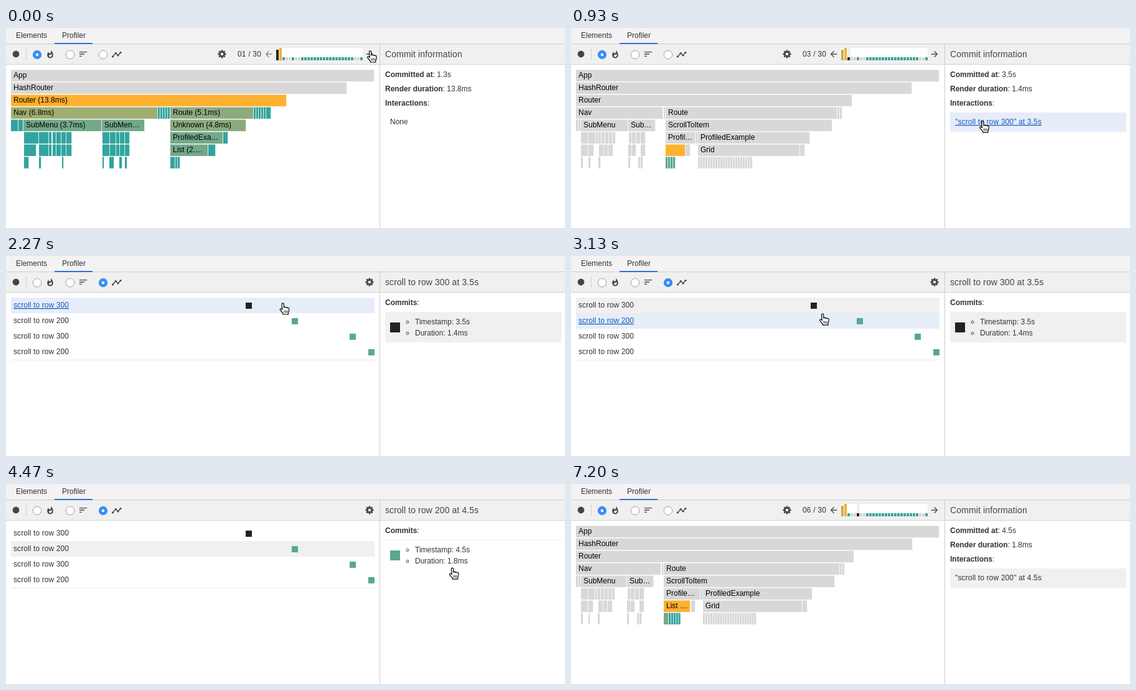
These frames come from a looping animation (898 by 322 pixels, 7590 ms). An HTML page:

```html
<!DOCTYPE html>
<html lang="en">
<head>
<meta charset="utf-8">
<title>Profiler</title>
<style>
html, body { margin: 0; width: 100%; height: 100%; overflow: hidden; background: #fff; }
svg { display: block; width: 898px; height: 322px; font-family: "Liberation Sans", Arial, sans-serif; font-size: 12px; }
text { white-space: pre; }
</style>
</head>
<body>
<svg viewBox="0 0 898 322">
  <g id="scene"></g>
  <g id="hand" stroke="#000" stroke-linejoin="round" stroke-linecap="round">
    <path fill="#fff" stroke-width="1.2" d="M-4.5-7.5c0-2.2 3.2-2.2 3.2 0L-1.1-2c.6-1.5 2.8-1.2 2.9.2 .8-1.1 2.6-.8 2.8.6 1-.8 2.6-.3 2.6 1.2 0 3-.3 4.5-1.4 6.5V9H-2.6V7.5C-3.8 5.9-5.4 4.1-7 2.1c-1.2-1.6.8-3 2.2-1.7l1.1 1.1z"/>
    <path fill="none" stroke-width=".9" d="M-.6 3v3.2M1.7 3v3.2M4 3v3.2"/>
  </g>
</svg>
<script>
const LOOP = 7590, STEP = 1000 / 15;
const GREY = '#d8d8d8', TEAL = '#32a49f', GOLD = '#feb02f', SAGE = '#74a88b', MOSS = '#8bab7e', OLIVE = '#a0ad70';
const MINT = '#58a892', INK = '#222', ICON = '#454545', PANEL = '#f0f0f0', HOVER = '#e6edf9', LINK = '#1259bd';

// time, x, y of the pointer
const PATH = [
  [0, 588, 46], [400, 589, 47], [800, 655, 143], [930, 664, 159], [1270, 671, 162], [2000, 671, 162],
  [2270, 447, 85], [2730, 406, 84], [2800, 406, 85], [3130, 407, 102], [3330, 421, 121], [3800, 421, 121],
  [4130, 600, 168], [4470, 720, 144], [4800, 724, 128], [5330, 724, 128], [5670, 505, 47],
  [6130, 462, 45], [6330, 530, 41], [6470, 591, 53], [LOOP, 591, 53]
];
const COMMITS = {
  1: { at: '1.3s', took: '13.8ms' },
  2: { at: '2.6s', took: '14.9ms' },
  3: { at: '3.5s', took: '1.4ms', label: '"scroll to row 300" at 3.5s' },
  6: { at: '4.5s', took: '1.8ms', label: '"scroll to row 200" at 4.5s', picked: true }
};
const ROWS = [[300, 385], [200, 459], [300, 552], [200, 582]];

const rect = (x, y, w, h, fill) => `<rect x="${x}" y="${y}" width="${w}" height="${h}" fill="${fill}"/>`;
const text = (x, y, s, fill = '#333', more = '') => `<text x="${x}" y="${y}" fill="${fill}" ${more}>${s}</text>`;
const icon = (x, y, scale, d, fill = ICON) =>
  `<path transform="translate(${x} ${y}) scale(${scale}) translate(-12 -12)" fill="${fill}" d="${d}"/>`;
const bold = s => `<tspan font-weight="bold">${s}</tspan>`;
const spaced = n => `letter-spacing="${n}"`;
const times = (n, f) => Array.from({ length: n }, (_, i) => f(i)).join('');

function gear(x, y) {
  const teeth = times(8, i => `<path d="M0-4v-2.6" stroke-width="2.6" transform="rotate(${i * 45})"/>`);
  return `<g transform="translate(${x} ${y})" fill="none" stroke="${ICON}"><circle r="3.7" stroke-width="2.8"/>${teeth}</g>`;
}

function radio(x, on) {
  return on
    ? `<circle cx="${x}" cy="43" r="7.2" fill="#3a8ef6"/><circle cx="${x}" cy="43" r="2.2" fill="#fff"/>`
    : `<circle cx="${x}" cy="43" r="6.8" fill="#fff" stroke="#a0a0a0"/>`;
}

function chrome(flame) {
  const dots = [[171.5, 46], [176.3, 40.5], [180, 44], [184, 39.5]];
  return rect(0, 0, 898, 25, '#f3f3f3') + rect(0, 26, 898, 32, PANEL) +
    rect(0, 25, 898, 1, '#ccc') + rect(0, 58, 898, 1, '#d2d2d2') + rect(600, 26, 1, 296, '#ccc') +
    rect(78, 24, 61, 2, '#2d70d8') + text(16, 16, 'Elements') + text(90, 16, 'Profiler') +
    `<circle cx="16" cy="42" r="5.4" fill="${ICON}"/>` + rect(32, 33, 1, 18, '#d0d0d0') +
    radio(50, flame) + radio(103, false) + radio(156, !flame) +
    icon(71, 42.5, .6, 'M13.5.67s.74 2.65.74 4.8c0 2.06-1.35 3.73-3.41 3.73-2.07 0-3.63-1.67-3.63-3.73l.03-.36C5.21 7.51 4 10.62 4 14c0 4.42 3.58 8 8 8s8-3.58 8-8C20 8.61 17.41 3.8 13.5.67zM11.71 19c-1.78 0-3.22-1.4-3.22-3.14 0-1.62 1.05-2.76 2.81-3.12 1.77-.36 3.6-1.21 4.62-2.58.39 1.29.59 2.65.59 4.04 0 2.65-2.15 4.8-4.8 4.8z') +
    icon(124, 42, .68, 'M3 18h6v-2H3v2zM3 6v2h18V6H3zm0 7h12v-2H3v2z') +
    `<polyline points="${dots.join(' ')}" fill="none" stroke="${ICON}" stroke-width="1.4"/>` +
    dots.map(([x, y]) => `<circle cx="${x}" cy="${y}" r="1.6" fill="${ICON}"/>`).join('') +
    gear(flame ? 347 : 584, 42);
}

function snapshots(n) {
  const bar = i => {
    const x = 434 + i * 5, h = i == 0 ? 17 : i == 1 ? 20 : 5;
    const teal = i == 2 || i == 5 || i == 27 || (i > 7 && i < 25);
    const fill = i == n - 1 ? INK : i == 0 ? '#d0aa48' : i == 1 ? '#f2b038' : teal ? '#3da598' : '#d4d4d4';
    return (i == n - 1 ? rect(x, 32, 5, 20, PANEL) : '') + rect(x, 52 - h, 4, h, fill);
  };
  return text(372, 46, `0${n} / 30`, '#333', spaced(.2)) + rect(434, 32, 139, 20, '#fff') + times(28, bar) +
    icon(422, 42, .66, 'M20 11H7.83l5.59-5.59L12 4l-8 8 8 8 1.41-1.41L7.83 13H20v-2z', n == 1 ? '#858585' : ICON) +
    icon(584, 42, .66, 'M4 11h12.17l-5.59-5.59L12 4l8 8-8 8-1.41-1.41L16.17 13H4v-2z');
}

// one flame chart cell, or a row of unlabelled ones given as start/end pairs
function cell(row, x, end, fill, label = '') {
  const y = 67 + row * 20;
  return rect(x, y + .5, end - x - .8, 18.6, fill) + (label && text(x + 4, y + 13, label, '#000'));
}
function cells(row, fill, ...ends) {
  let out = '';
  for (let i = 0; i < ends.length; i += 2) out += cell(row, ends[i], ends[i + 1], fill);
  return out;
}
const run = (row, fill, x, n, pitch) => times(n, i => cell(row, x + i * pitch, x + (i + 1) * pitch, fill));

function firstTree() {
  const leaves = row =>
    cells(row, TEAL, 53, 69, 69, 74, 75, 81, 81, 89, 89, 97, 97, 106, 155, 167, 167, 177, 177, 183, 183, 191, 191, 199);
  return cell(0, 8, 592, GREY, 'App') + cell(1, 8, 548, GREY, 'HashRouter') +
    cell(2, 8, 451, GOLD, 'Router (13.8ms)') +
    cell(3, 8, 244, OLIVE, 'Nav (6.8ms)') + run(3, TEAL, 244, 5, 4) +
    cell(3, 264, 398, MOSS, 'Route (5.1ms)') + run(3, TEAL, 398, 5, 4) + cells(3, TEAL, 418, 426) +
    cells(4, TEAL, 8, 20, 20, 28) + cell(4, 28, 154, SAGE, 'SubMenu (3.7ms)') +
    cell(4, 154, 223, SAGE, 'SubMen…') + cell(4, 264, 386, MOSS, 'Unknown (4.8ms)') +
    cells(5, TEAL, 29, 53) + leaves(5) + cell(5, 264, 349, SAGE, 'ProfiledExa…') + cells(5, TEAL, 349, 357) +
    cells(6, TEAL, 29, 49) + leaves(6) + cell(6, 264, 325, SAGE, 'List (2.…') + cells(6, TEAL, 325, 337) +
    cells(7, TEAL, 29, 37, 53, 57, 90, 93, 155, 158, 166, 174, 182, 187, 191, 195, 264, 272, 272, 276, 276, 280);
}

function navTree(scale) {
  const s = x => Math.round(8 + (x - 8) * scale);
  const part = (row, ...xs) => cells(row, GREY, ...xs.map(s));
  return cell(3, 8, s(148), GREY, 'Nav') + part(3, 149, 152) + part(4, 8, 12, 12, 16) +
    cell(4, 16, s(92), GREY, 'SubMenu') + cell(4, s(92), s(136), GREY, 'Sub…') +
    part(5, 16, 28, 28, 40, 40, 44, 44, 49, 49, 55, 55, 61, 61, 67, 67, 72, 93, 98, 98, 105, 105, 112, 112, 120) +
    part(6, 16, 28, 28, 37, 45, 53, 53, 60, 60, 68, 92, 98, 98, 105, 112, 120) +
    part(7, 16, 20, 28, 32, 44, 48, 92, 96, 108, 112, 112, 116);
}

function laterTree(n) {
  const six = n == 6, hot = n == 2, pick = (a, b) => six ? a : b;
  const warm = hot ? GOLD : GREY, mild = hot ? OLIVE : GREY, x = pick(149, 152), x2 = pick(212, 204);
  return cell(0, 8, 592, GREY, 'App') + cell(1, 8, pick(549, 548), GREY, 'HashRouter') +
    cell(2, 8, pick(455, 452), GREY, 'Router') + navTree(pick(.979, 1)) +
    cell(3, x, pick(432, 428), warm, 'Route') + run(3, GREY, pick(432, 428), 2, 4) +
    cell(4, x, pick(424, 420), warm, 'ScrollToItem') +
    cell(5, x, x2 - 4, mild, pick('Profile…', 'Profil…')) + cell(5, x2 - 4, x2, GREY) +
    cell(5, x2, pick(388, 384), mild, 'ProfiledExample') +
    cell(6, x, pick(192, 184), hot ? TEAL : GOLD, pick('List …', '')) + cell(6, pick(193, 184), pick(200, 192), GREY) +
    cell(6, x2, pick(372, 368), mild, 'Grid') + cell(6, pick(372, 368), pick(380, 376), GREY) +
    (six ? cell(7, 149, 157, SAGE) + run(7, TEAL, 157, 5, 3.9) : run(7, MINT, 152, 4, 4)) +
    run(7, hot ? TEAL : GREY, x2, 22, pick(3.92, 4));
}

function flameView(n, hover) {
  const { at, took, label, picked } = COMMITS[n], over = hover == 'link';
  let out = chrome(true) + snapshots(n) + (n == 1 ? firstTree() : laterTree(n)) +
    text(609, 47, 'Commit information', '#444', 'font-size="14" ' + spaced(.14)) +
    text(609, 79, `${bold('Committed at')}: ${at}`) +
    text(609, 102, `${bold('Render duration')}: ${took}`) +
    text(609, 125, `${bold('Interactions')}:`);
  if (!label) return out + text(617, 155, 'None');
  if (over || picked) out += rect(609, 136, 283, 31, over ? HOVER : PANEL);
  return out + text(617, 155, label, over ? LINK : '#333', spaced(.14) + (over ? ' text-decoration="underline"' : ''));
}

function listView(sel, hover) {
  const { at, took } = COMMITS[sel ? 6 : 3];
  const row = ([n, x], i) => {
    const y = 67 + i * 25, over = hover == 'row' + i;
    const fill = over ? HOVER : i == sel ? PANEL : '#fff';
    return rect(8, y, 584, 25, fill) + rect(8, y + 25, 584, 1, '#ebebeb') +
      text(12, y + 16, `scroll to row ${n}`, over ? LINK : '#333', spaced(.1) + (over ? ' text-decoration="underline"' : '')) +
      rect(x, y + 8, 10, 10, i ? MINT : INK);
  };
  const bullet = (y, s) => `<circle cx="645" cy="${y - 3.5}" r="2" fill="none" stroke="#444"/>` + text(657, y, s);
  const box = hover == 'commit' ? HOVER : sel ? '' : PANEL;
  return chrome(false) + ROWS.map(row).join('') +
    text(609, 47, `scroll to row ${ROWS[sel][0]} at ${at}`, '#444', 'font-size="14" ' + spaced(.1)) +
    text(609, 79, `${bold('Commits')}:`) +
    (box ? rect(609, 90, 283, 49, box) : rect(609, 90, 283, 1, '#ececec')) +
    rect(617, 107, 16, 16, sel ? MINT : INK) +
    bullet(110, `Timestamp: ${at}`) + bullet(128, `Duration: ${took}`);
}

// monotone cubic through the pointer path
function pointer(t) {
  const slope = (i, k) => i < 0 || i > PATH.length - 2 ? 0 : (PATH[i + 1][k] - PATH[i][k]) / (PATH[i + 1][0] - PATH[i][0]);
  const tangent = (i, k) => {
    const a = slope(i - 1, k), b = slope(i, k);
    return a * b > 0 ? 2 * a * b / (a + b) : 0;
  };
  let i = 0;
  while (i < PATH.length - 2 && t >= PATH[i + 1][0]) i++;
  const d = PATH[i + 1][0] - PATH[i][0], u = Math.min(1, (t - PATH[i][0]) / d), v = 1 - u;
  return [1, 2].map(k =>
    PATH[i][k] * (1 + 2 * u) * v * v + tangent(i, k) * d * u * v * v +
    PATH[i + 1][k] * u * u * (3 - 2 * u) - tangent(i + 1, k) * d * u * u * v);
}

function hoverAt(x, y, list) {
  if (!list) return x > 609 && x < 892 && y > 136 && y < 166 ? 'link' : '';
  if (x > 640 && x < 892 && y > 90 && y < 133) return 'commit';
  const i = Math.floor((y - 67) / 25.2);
  return x > 8 && x < 592 && i >= 0 && i < 4 ? 'row' + i : '';
}

const scene = document.getElementById('scene'), hand = document.getElementById('hand');
let shown = '';

function draw(ms) {
  const t = Math.floor((ms % LOOP + 4) / STEP) * STEP;
  const [x, y] = pointer(t);
  const list = t > 1525 && t < 4990;
  const pick = list ? (t > 3795 ? 1 : 0) : t < 195 ? 1 : t < 395 ? 2 : t < 1525 ? 3 : 6;
  const hover = hoverAt(x - 3, y - 10, list);
  const key = [list, pick, hover].join();
  if (key != shown) {
    scene.innerHTML = list ? listView(pick, hover) : flameView(pick, hover);
    shown = key;
  }
  hand.setAttribute('transform', `translate(${x.toFixed(1)} ${y.toFixed(1)})`);
  hand.setAttribute('opacity', Math.max(0, Math.min(1, (7195 - t) / 260)));
}

const start = performance.now();
function tick() {
  draw(performance.now() - start);
  requestAnimationFrame(tick);
}
tick();
</script>
</body>
</html>
```
